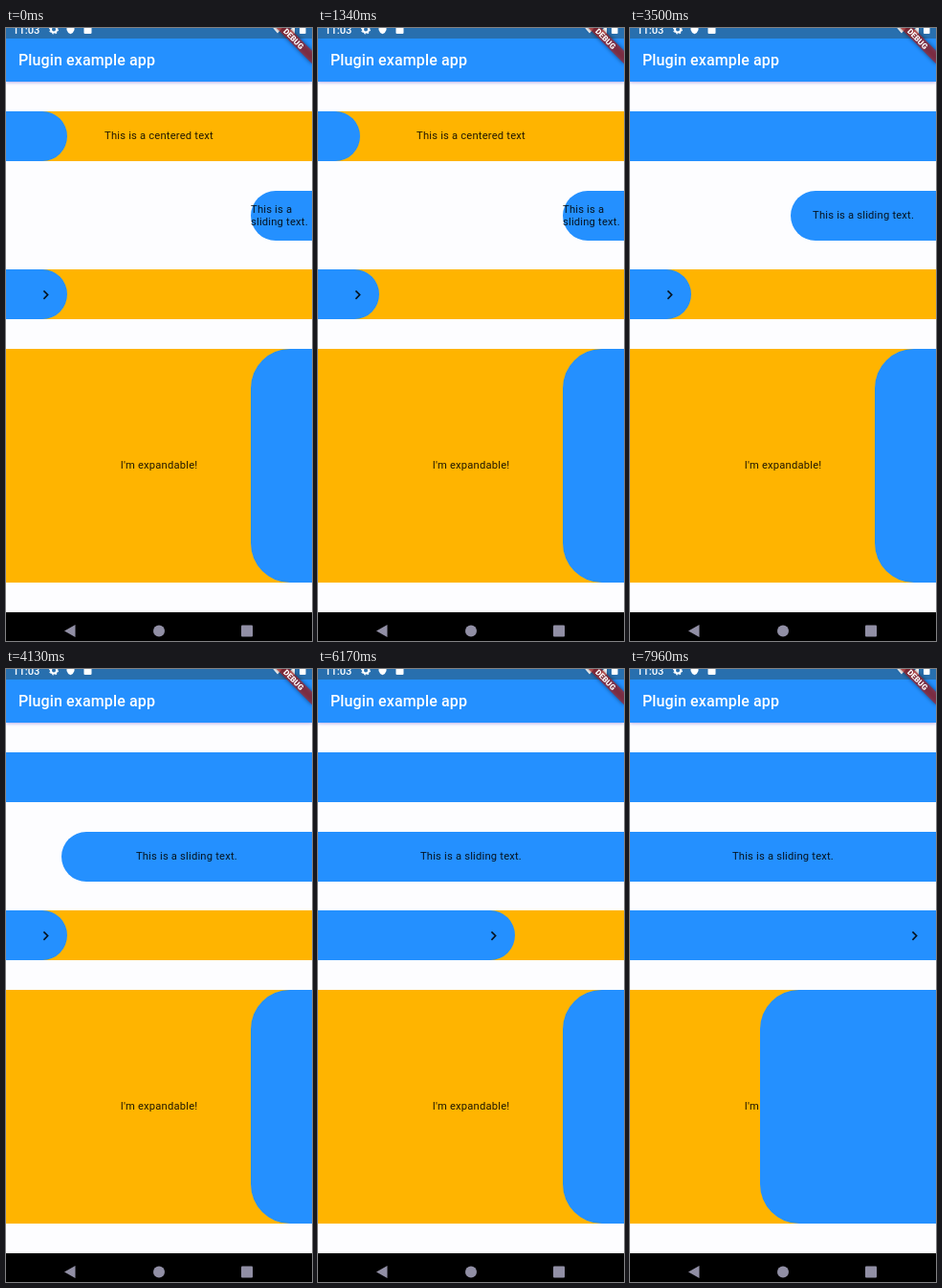
Animation, 320 px wide and 640 px high, one loop 8 s. Source, as an HTML page:

```html
<!DOCTYPE html>
<html lang="en">
<head>
<meta charset="utf-8">
<title>Plugin example app</title>
<style>
  html, body { margin: 0; width: 100%; height: 100%; overflow: hidden; }
  body { position: relative; background: #fdfdff; color: rgba(0, 0, 0, .87);
    font: 11.2px/13.1px Roboto, sans-serif; letter-spacing: .2px; }
  header, .row, .bar, svg { position: absolute; }
  header { left: 0; right: 0; top: 0; height: 56px; background: #2490ff; box-shadow: 0 1px 3px #5a48d070; }
  h1 { position: absolute; left: 13px; top: 24px; margin: 0; color: #fff;
    font: 500 16px/20px Roboto, sans-serif; letter-spacing: .12px; white-space: nowrap; }
  .row { left: 0; width: 320px; height: 52px; overflow: hidden; }
  .row, .bar { display: flex; align-items: center; justify-content: center; }
  .gold { background: #ffb400; }
  .bar { top: 0; height: 100%; background: #2490ff; }
  .bar svg { right: 12.8px; }
  #one, #three { left: 0; }
  #two, #four { right: 0; }
  #chrome { left: 0; top: 0; }
</style>
</head>
<body>
<header><h1>Plugin example app</h1></header>
<div class="row gold" style="top:87px">This is a centered text<div class="bar" id="one"></div></div>
<div class="row" style="top:169.6px"><div class="bar" id="two"><span>This is a sliding text.</span></div></div>
<div class="row gold" style="top:252.2px"><div class="bar" id="three">
  <svg width="19.2" height="19.2" viewBox="0 0 24 24"><path fill="#000" fill-opacity=".87" d="M10 6 8.59 7.41 13.17 12 8.59 16.59 10 18l6-6z"/></svg>
</div></div>
<div class="row gold" style="top:335px;height:244px">I'm expandable!<div class="bar" id="four"></div></div>

<svg id="chrome" width="320" height="640">
  <defs><filter id="soft" x="-20%" y="-80%" width="140%" height="260%"><feGaussianBlur stdDeviation="2"/></filter></defs>
  <path fill="#286fae" d="M0 0h320v11H0z"/>
  <g fill="#fff">
    <text x="7" y="5.5" font-size="11.2" font-weight="500" letter-spacing="0">11:03</text>
    <circle cx="50" cy="1.5" r="3" fill="none" stroke="#fff" stroke-width="2"/>
    <circle cx="50" cy="1.5" r="4.4" fill="none" stroke="#fff" stroke-width="1.2" stroke-dasharray="1.7 1.75"/>
    <path d="M63.5 0h8v2q-.8 3-4 4.300-3.200-1.300-4-4.300z"/>
    <rect x="81.500" y="-3" width="8" height="9" rx="1"/>
    <path d="M277.500-2h13L284 5.500z"/>
    <path d="M293 6 302-3V6z"/>
    <rect x="307" y="-3" width="6.500" height="9" rx=".8"/>
  </g>
  <g transform="translate(320 -8) rotate(45)">
    <rect x="-32" y="22.400" width="64" height="9.600" fill="#000" opacity=".5" filter="url(#soft)"/>
    <rect x="-32" y="22.400" width="64" height="9.600" fill="#b71c1c" opacity=".627"/>
    <text y="30.200" text-anchor="middle" font-size="8.200" font-weight="900" letter-spacing="0" fill="#fff">DEBUG</text>
  </g>
  <path d="M0 610h320v30H0z"/>
  <g fill="#918fa5">
    <path d="M61 629.500 72.500 623v13z"/>
    <circle cx="160" cy="629.500" r="6"/>
    <rect x="246" y="623.500" width="12" height="12" rx="1"/>
  </g>
</svg>

<script>
const FULL = 320, REST = 64, LOOP = 8000;
const clamp = (v, lo, hi) => Math.min(hi, Math.max(lo, v));
const swing = p => (1 - Math.cos(Math.PI * p)) / 2;

// points: [time, width]; eased legs turn gently, the others run straight
function drag(t, points, eased = 0) {
  if (t <= points[0][0]) return points[0][1];
  for (let i = 1; i < points.length; i++) {
    const [t0, a] = points[i - 1], [t1, b] = points[i];
    if (t < t1) {
      const p = (t - t0) / (t1 - t0);
      return a + (b - a) * (i <= eased ? swing(p) : p);
    }
  }
  return points[points.length - 1][1];
}

// Critically damped spring to full width; the last sliver closes at `shut`
function slide(t, { points, eased, speed, shut }) {
  const [free, from] = points[points.length - 1];
  if (t < free) return drag(t, points, eased);
  if (t >= shut) return FULL;
  const s = (t - free) / 1000, w = Math.sqrt(500), gap = FULL - from;
  return FULL - Math.max(1.5, (gap + (w * gap - speed) * s) * Math.exp(-w * s));
}

const bars = [
  { id: "one", side: "right", radius: 26, eased: 2, speed: 178, shut: 3000,
    points: [[40, REST], [650, 155], [1340, 44], [2490, 252]] },
  { id: "two", side: "left", radius: 26, speed: 175, shut: 4710,
    points: [[3000, REST], [4130, 262], [4250, 283]] },
  { id: "three", side: "right", radius: 26, speed: 111, shut: 7250,
    points: [[5000, REST], [5420, 122], [6750, 270]] },
  { id: "four", side: "left", radius: 41, speed: 0, shut: LOOP + 1,
    points: [[7250, REST], [7960, 184], [LOOP, 191]] }
];

function draw(now) {
  const t = now % LOOP;
  for (const bar of bars) {
    const w = slide(t, bar), style = document.getElementById(bar.id).style;
    const r = bar.radius * clamp((FULL - w - 16) / 20, 0, 1) + "px";
    style.width = w + "px";
    style.borderRadius = bar.side === "right" ? `0 ${r} ${r} 0` : `${r} 0 0 ${r}`;
  }
  requestAnimationFrame(draw);
}
draw(0);
</script>
</body>
</html>
```
